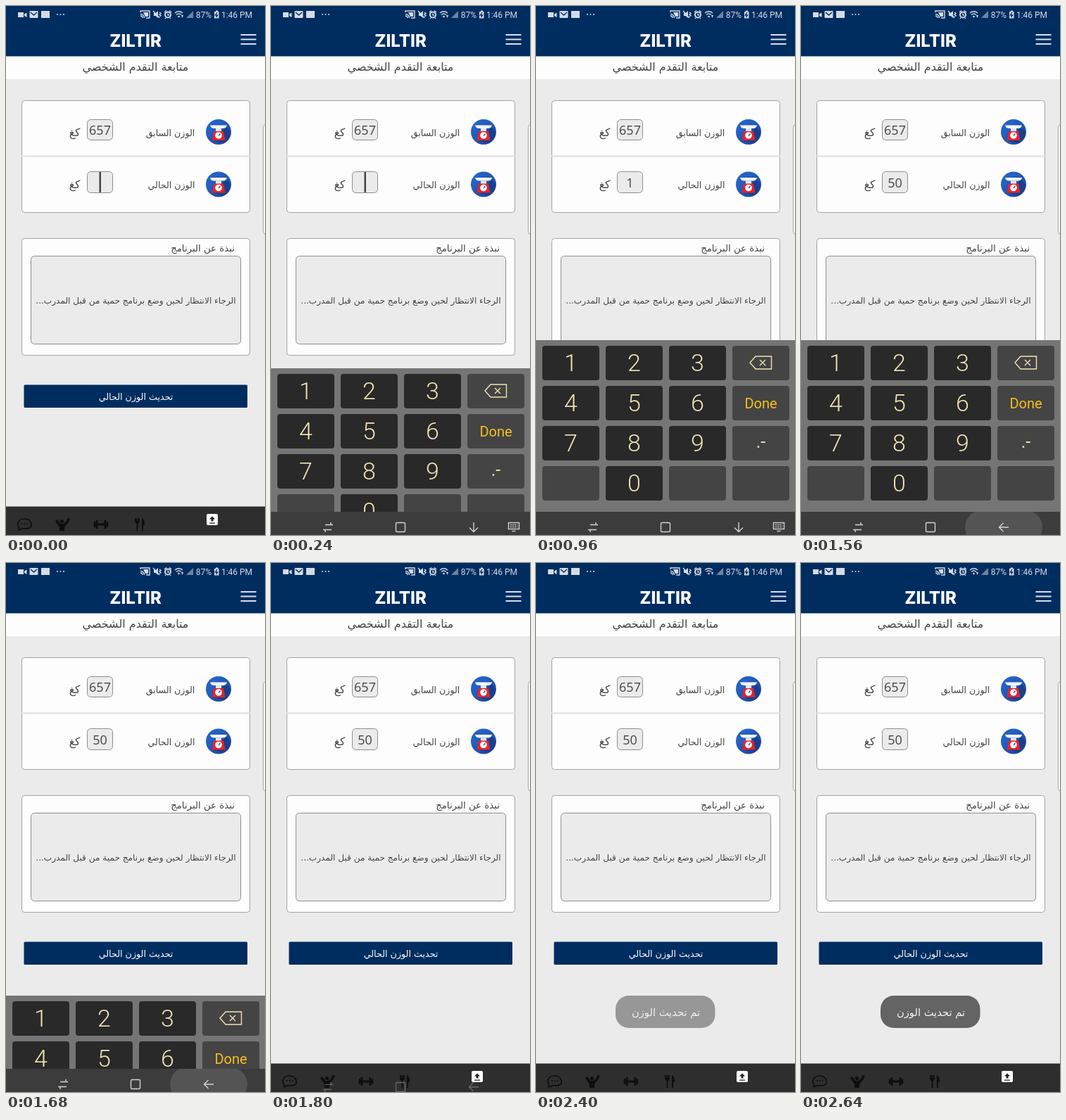
Recreate the animation shown at these times as an HTML page. Size 368 by 752 pixels, loop 2.88 s.

```html
<!DOCTYPE html>
<html lang="ar">
<head>
<meta charset="utf-8">
<title>Weight tracker</title>
<style>
  html, body { margin: 0; width: 100%; height: 100%; overflow: hidden; background: #ebebeb; }
  svg { display: block; width: 368px; height: 752px; }
  text { text-anchor: middle; }
  .ar { font-family: "DejaVu Sans", sans-serif; direction: rtl; fill: #444; }
  .val { font: 18px "Open Sans", sans-serif; fill: #444; }
  .status { font: 12px Roboto, sans-serif; fill: #d5dbe5; }
  .key { font: 300 34px Roboto, sans-serif; fill: #f3e2b3; }
  .line { fill: none; stroke-width: 1.4; }
</style>
</head>
<body>
<svg viewBox="0 0 368 752">
  <defs>
    <clipPath id="aboveNav"><rect width="368" height="719"/></clipPath>
    <clipPath id="navClip"><rect y="719" width="368" height="33"/></clipPath>
    <linearGradient id="disc" x1="0" y1="0" x2="1" y2="1">
      <stop offset="0.3" stop-color="#2461c4"/><stop offset="0.9" stop-color="#1b4498"/>
    </linearGradient>
    <g id="scale">
      <circle r="18" fill="url(#disc)"/>
      <path d="M11-7L17 0Q16 10 8 16L-8 12Z" fill="#183f8e"/>
      <path d="M-12-9.500H12Q11-5 6-5H-6Q-11-5-12-9.500Z" fill="#f4f4f4"/>
      <path d="M-4-5H4V0H-4Z" fill="#e4e7ec"/>
      <path d="M-7-1H7L9.500 12H-9.500Z" fill="#e3232f"/>
      <circle cy="5" r="4.800" fill="#fff"/>
      <path d="M0 5.500L2.500 2.500" stroke="#444" stroke-width="1.200"/>
    </g>
  </defs>

  <rect width="368" height="752" fill="#ebebeb"/>
  <rect width="368" height="72" fill="#002d60"/>

  <g fill="#d5dbe5">
    <path d="M17 9h8v7h-8zM26 11.500l3.500-2v6.500l-3.500-2z"/>
    <rect x="33.500" y="7" width="12" height="10" rx="1"/>
    <path d="M35 9l4.500 4L44 9" class="line" stroke="#002d60"/>
    <rect x="50" y="7" width="12" height="10"/>
    <circle cx="73" cy="12" r="1"/><circle cx="77.500" cy="12" r="1"/><circle cx="82" cy="12" r="1"/>
    <path d="M191 9V7h13v10h-5M191 11.500a5.500 5.500 0 0 1 5.500 5.500M191 14a3 3 0 0 1 3 3" class="line" stroke="#d5dbe5"/>
    <path d="M195 9h7v6h-4z"/>
    <path d="M210 10h2.500l3.500-3v10l-3.500-3H210z"/>
    <path d="M209 7l9 10M218 9l2 1.500-2 1.500 2 1.500-2 1.500" class="line" stroke="#d5dbe5"/>
    <circle cx="230" cy="12.500" r="4" class="line" stroke="#d5dbe5" style="stroke-width:2"/>
    <path d="M225 9l3-2.500M235 9l-3-2.500M230 10.500v2.500h2M227 17l-1 1M233 17l1 1" class="line" stroke="#d5dbe5"/>
    <path d="M240 10q5.500-4.500 11 0M242 12.500q3.500-3 7 0" class="line" stroke="#d5dbe5"/>
    <circle cx="245.500" cy="15" r="1.300"/><path d="M249 13l1.500 4 1.500-4z"/>
    <path d="M256 17l10-10v10z" fill="#71839d"/>
    <path d="M296 8h2V6.500h3V8h1.500v9.500H296z"/>
    <path d="M300 9l-2.500 4h3L298.500 16" class="line" stroke="#002d60"/>
  </g>
  <text class="status" x="281" y="17">87%</text>
  <text class="status" x="328" y="17">1:46 PM</text>
  <text x="184" y="57.500" font-family="Inter, sans-serif" font-size="24" font-weight="800" fill="#fff">ZILTIR</text>
  <path d="M333.500 41h22M333.500 47.500h22M333.500 54h22" stroke="#d9e0e9" stroke-width="2"/>

  <rect y="71.500" width="368" height="32.500" fill="#fdfdfd"/>
  <text class="ar" x="184" y="92" font-size="16">متابعة التقدم الشخصي</text>

  <g fill="#fdfdfd" stroke="#a3a3a3">
    <rect x="365.500" y="168.500" width="20" height="156" rx="4"/>
    <rect x="22.500" y="134.500" width="324" height="159" rx="4"/>
    <rect x="22.500" y="330.500" width="324" height="166" rx="4"/>
  </g>
  <path d="M22 213.500h325" stroke="#dedede" stroke-width="2"/>
  <g fill="#ebebeb" stroke="#8e8e8e">
    <rect x="115.500" y="161.500" width="36" height="29" rx="5"/>
    <rect x="115.500" y="235.500" width="36" height="30" rx="5"/>
    <rect x="35.500" y="355.500" width="298" height="125" rx="5"/>
  </g>
  <use href="#scale" x="302" y="179"/>
  <use href="#scale" x="302" y="253.500"/>
  <text class="ar" x="233.500" y="185" font-size="12.600">الوزن السابق</text>
  <text class="ar" x="235" y="259" font-size="12.600">الوزن الحالي</text>
  <text class="ar" x="97.500" y="185" font-size="15.500">كغ</text>
  <text class="ar" x="97.500" y="259" font-size="15.500">كغ</text>
  <text class="val" x="133.500" y="183">657</text>
  <text class="val" id="value" x="133.500" y="258"></text>
  <rect id="caret" x="132.500" y="236" width="2.500" height="29" fill="#444"/>
  <text class="ar" x="279.500" y="349" font-size="13.300">نبذة عن البرنامج</text>
  <text class="ar" x="184.500" y="423" font-size="12.100">الرجاء الانتظار لحين وضع برنامج حمية من قبل المدرب...</text>
  <rect x="25.500" y="538.500" width="317.500" height="32.500" rx="1.500" fill="#002d60"/>
  <text class="ar" x="184.500" y="560" font-size="12.700" style="fill:#fff">تحديث الوزن الحالي</text>

  <g id="toast">
    <rect x="113" y="615" width="141.500" height="46" rx="19" fill="#646464"/>
    <text class="ar" x="184.500" y="644" font-size="14.700" style="fill:#f4f4f4">تم تحديث الوزن</text>
  </g>

  <g id="tabs">
    <rect y="711.500" width="368" height="41" fill="#2e2e2e"/>
    <g fill="none" stroke="#0e0e0e" stroke-width="1.600">
      <path d="M19 743q-3-4-2-8 2-6 9.500-6t9.500 7-9.500 7q-2 0-3.500-.5-2 2.500-5 2 1.500-1 1-1.500z"/>
      <path d="M22 736h1.500M26 736h1.500M30 736h1.500" stroke-width="2"/>
      <path d="M124.500 737h21M129 731v12M141 731v12" stroke-width="3"/>
      <path d="M126 733v8M144 733v8" stroke-width="2"/>
      <path d="M184 728v6M186.500 728v6M189 728v6M186.500 734v12.500" stroke-width="1.800"/>
    </g>
    <g fill="#0e0e0e">
      <circle cx="79.500" cy="732.500" r="2.600"/>
      <path d="M70 732l3-2 4 6h5l4-4 1-4 4 1-3 6-4 4-1 3v4h-7v-5z"/>
      <path d="M183 732h7q0 4-3.500 4T183 732zM193 728q4 1 4 10h-2v8.500h-2z"/>
    </g>
    <rect x="285" y="722" width="16" height="16" rx="2" fill="#fff"/>
    <path d="M293 725.500l4 4h-2.500v3h-3v-3H289zM289 734.500h8v1.200h-8z" fill="#222"/>
  </g>

  <g clip-path="url(#aboveNav)">
    <g id="keyboard"><rect y="475" width="368" height="280" fill="#757575"/></g>
  </g>

  <g clip-path="url(#navClip)">
    <g id="nav">
      <rect id="navBack" y="719" width="368" height="33" fill="#3c3c3c"/>
      <rect id="ripple" x="233" y="717" width="110" height="48" rx="24" fill="#545454"/>
      <g class="line" stroke="#d2d2d2">
        <path d="M77 737.500h11M85 734v3.500M74 744.500h12M77 744.500v3.500"/>
        <rect x="177.500" y="734.500" width="13" height="13" rx="1.500"/>
        <path id="arrow" d="M288 734v13M282 741.500l6 6 6-6"/>
        <g id="switcher">
          <rect x="337.500" y="734.500" width="15" height="9"/>
          <path d="M340 737.500h10M340 740.500h10" stroke-dasharray="2 1"/>
          <path d="M342.500 746.500h5"/>
        </g>
      </g>
    </g>
  </g>
</svg>
<script>
const LOOP = 2880, STEP = 120;
const $ = id => document.getElementById(id);
const svg = (tag, attrs, parent) => {
  const el = document.createElementNS("http://www.w3.org/2000/svg", tag);
  for (const k in attrs) el.setAttribute(k, attrs[k]);
  return parent.appendChild(el);
};

const keyboard = $("keyboard");
let backspace;
["1", "2", "3", "del", "4", "5", "6", "Done", "7", "8", "9", ".-", "", "0", "", ""].forEach((label, i) => {
  const x = 9 + 90 * (i % 4), y = 483 + 57 * (i >> 2);
  const digit = /^\d$/.test(label);
  const key = svg("rect", { x, y, width: 81, height: 49, rx: 4, fill: digit ? "#292929" : "#444" }, keyboard);
  if (label === "del") {
    backspace = key;
    svg("path", { d: "M304 507l8-9h22.500v18H312zM318 503l8 8M326 503l-8 8", class: "line", stroke: "#f3e2b3" }, keyboard);
  } else if (label) {
    const done = label === "Done";
    const t = svg("text", { x: x + 40.5, y: y + (done ? 31.5 : digit ? 36 : 31), class: "key" }, keyboard);
    t.textContent = label;
    if (done) t.style.cssText = "font-size:20px;font-weight:400;fill:#f6c01c";
    else if (!digit) t.style.cssText = "font-size:25px;font-weight:400";
  }
});

// [start ms, value] tables, held until the next entry
const tracks = {
  value: [[0, ""], [720, "1"], [1200, ""], [1320, "5"], [1440, "50"]],
  slide: [[0, 280], [120, 190], [240, 40], [360, 0], [1680, 140], [1800, 280]],
  tabs: [[0, 0], [120, -33], [1800, 0]],
  nav: [[0, 0], [120, 1], [1800, 0.35], [1920, 0]],
  navDrop: [[0, 0], [1800, 4]],
  back: [[0, 0], [1560, 1]],
  ripple: [[0, 0], [1560, 1], [1800, 0]],
  press: [[0, 0], [1080, 1], [1200, 0]],
  toast: [[0, 0], [2280, 0.2], [2400, 0.62], [2520, 0.9], [2640, 1]]
};
const at = (name, t) => tracks[name].reduce((v, [start, next]) => t >= start ? next : v, 0);
const show = (id, opacity) => $(id).setAttribute("opacity", opacity);
const shift = (id, y) => $(id).setAttribute("transform", `translate(0 ${y})`);

function render(ms) {
  const t = Math.floor((ms % LOOP) / STEP) * STEP;
  const value = at("value", t), nav = at("nav", t), back = at("back", t);
  $("value").textContent = value;
  show("caret", value ? 0 : 1);
  shift("keyboard", at("slide", t));
  shift("tabs", at("tabs", t));
  shift("nav", at("navDrop", t));
  show("nav", nav);
  show("navBack", nav === 1 ? 1 : 0);
  show("ripple", at("ripple", t));
  show("switcher", back ? 0 : 1);
  $("arrow").setAttribute("transform", back ? "rotate(90 288 741)" : "");
  backspace.setAttribute("fill", at("press", t) ? "#666" : "#444");
  show("toast", at("toast", t));
}

const begin = performance.now();
function tick() {
  render(performance.now() - begin);
  requestAnimationFrame(tick);
}
tick();
</script>
</body>
</html>
```
